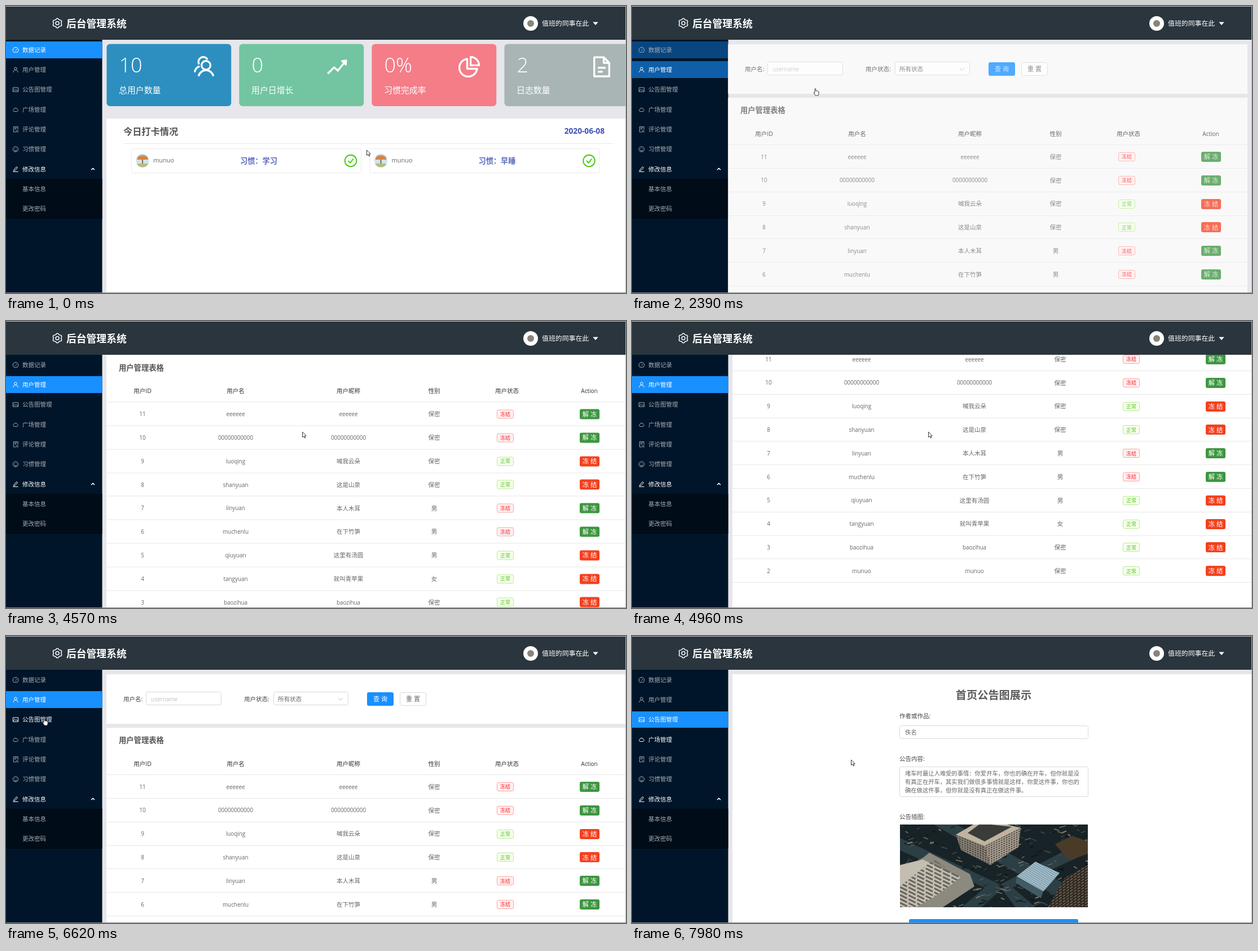
An HTML page with a canvas for the animation above (8000 ms loop, 1099x510 px).

```html
<!DOCTYPE html>
<html lang="zh-CN">
<head>
<meta charset="utf-8">
<style>
html, body { margin: 0; width: 100%; height: 100%; overflow: hidden; background: #e6e6eb; }
canvas { display: block; }
</style>
</head>
<body>
<canvas id="stage" width="1099" height="510"></canvas>
<script>
const ctx = document.getElementById('stage').getContext('2d');
const FONT = '"Open Sans", "Noto Sans CJK SC", "Noto Sans CJK", sans-serif';
const LOOP = 8000, STEP = 120;

// ---------- drawing helpers ----------
// y is the vertical middle of the glyphs
function text(s, x, y, size, color, weight = 400, align = 'left') {
  ctx.font = `${weight} ${size}px ${FONT}`;
  ctx.textAlign = align;
  ctx.fillStyle = color;
  ctx.fillText(s, x, y + size * 0.37);
}
function rect(x, y, w, h, fill, r = 0, stroke) {
  ctx.beginPath();
  ctx.roundRect(x, y, w, h, r);
  if (fill) { ctx.fillStyle = fill; ctx.fill(); }
  if (stroke) { ctx.strokeStyle = stroke; ctx.lineWidth = 1; ctx.stroke(); }
}
const box = (x, y, w, h, fill, stroke, r = 3) => rect(x + 0.5, y + 0.5, w - 1, h - 1, fill, r, stroke);
function disc(x, y, r, fill) {
  ctx.beginPath();
  ctx.arc(x, y, r, 0, 7);
  ctx.fillStyle = fill;
  ctx.fill();
}
// strokes (and optionally fills) an SVG path placed at x,y
function icon(d, x, y, scale, color, width, fill) {
  const p = new Path2D(d);
  ctx.save();
  ctx.translate(x, y);
  ctx.scale(scale, scale);
  ctx.lineWidth = width / scale;
  ctx.lineJoin = 'round';
  ctx.strokeStyle = color;
  if (fill) { ctx.fillStyle = fill; ctx.fill(p); }
  if (width) ctx.stroke(p);
  ctx.restore();
}
const lerp = (a, b, k) => a + (b - a) * k;
const hold = (t, keys) => keys.reduce((v, [at, value]) => t >= at ? value : v, 0);

// ---------- shell ----------
const RING = 'M9 0A9 9 0 1 1 -9 0A9 9 0 1 1 9 0Z';
const MENU = [
  ['数据记录', 'M-6 8A9.5 9.5 0 1 1 6 8ZM0 3L4 -3M-6 0h1M0 -6v1'],
  ['用户管理', 'M-4.5 -4A4.5 4.5 0 1 0 4.5 -4A4.5 4.5 0 1 0 -4.5 -4M-8 9A8 8 0 0 1 8 9'],
  ['公告图管理', 'M-9 -7H9V7H-9ZM-8 5L-3 -1L1 3L4 0L8 5M-5 -3h1'],
  ['广场管理', 'M-5 7A4.5 4.5 0 0 1 -6 -1A6.5 6.5 0 0 1 6 -1A4.5 4.5 0 0 1 5 7Z'],
  ['评论管理', 'M8 1V-9H-7V9H1M-4 -5H5M-4 -1H2M5 3a3 3 0 1 0 .1 0M7 8l2 2'],
  ['习惯管理', RING + 'M-4 2A4 4 0 0 0 4 2M-4 -3h2M2 -3h2'],
  ['修改信息', 'M-6 3L3 -8L7 -5L-2 5L-7 6ZM-9 9H9']
];
const menuY = i => 78 + i * 35.3;

function gearPath() {
  let d = '';
  for (let i = 0; i < 24; i++) {
    const a = (i + 1.5) * Math.PI / 12, r = i % 4 < 2 ? 8.4 : 7;
    d += (i ? 'L' : 'M') + r * Math.cos(a) + ' ' + r * Math.sin(a);
  }
  return d + 'ZM3 0A3 3 0 1 1 -3 0A3 3 0 1 1 3 0Z';
}
const GEAR = gearPath();

function header() {
  rect(0, 0, 1099, 60, '#2a353d');
  rect(0, 0, 1099, 1, '#c5c9ce');
  icon(GEAR, 91, 30.5, 1, '#fff', 1.5);
  text('后台管理系统', 107, 31.5, 17.8, '#fff', 700);
  disc(930, 31, 13, '#fff');
  disc(930, 31, 6, '#85857a');
  text('值班的同事在此', 950, 31, 11.9, '#fff', 500);
  icon('M-4.7 -2.5H4.7L0 3Z', 1045, 31, 1, '', 0, '#fff');
}

function sidebar(t) {
  rect(0, 60, 170.5, 450, '#001529');
  rect(0, 307, 170.5, 71, '#000c17');
  const on = [
    hold(t, [[0, 1], [2390, 0.4], [2510, 0]]),
    hold(t, [[2390, 0.6], [2510, 1], [6900, 0.4], [7020, 0]]),
    hold(t, [[6900, 0.6], [7020, 1]])
  ];
  MENU.forEach(([label, d], i) => {
    const y = menuY(i), top = Math.round(y - 15);
    ctx.globalAlpha = on[i] || 0;
    rect(0, top, 170.5, Math.round(y + 14.6) - top, '#1890ff');
    ctx.globalAlpha = 1;
    const bright = on[i] > 0.5 || i == 6 || (i == 2 && t >= 6500) || (i == 3 && t >= 7710);
    const color = bright ? '#fff' : '#a6adb4';
    icon(d, 17, y, 0.52, color, 1);
    text(label, 29, y, 10.5, color, i == 6 ? 500 : 400);
  });
  icon('M-3 1.5L0 -1.5L3 1.5', 154, menuY(6), 1, '#fff', 1.5);
  text('基本信息', 29, menuY(7), 10.5, '#a6adb4');
  text('更改密码', 29, menuY(8), 10.5, '#a6adb4');
}

// ---------- pages ----------
const CARDS = [
  ['10', '总用户数量', '#2d8fbf', 'M6.5 -1.5A4.5 4.5 0 1 1 -2.5 -1.5A4.5 4.5 0 1 1 6.5 -1.5M-5.5 9.5A7.7 7.7 0 0 1 9.5 9.5M3.5 -7.5A4.8 4.8 0 1 0 -5 -2.5M-9.5 5.5A7.5 7.5 0 0 1 -4.5 -.5'],
  ['0', '用户日增长', '#72c5a0', 'M-9 7L-2.5 .5L1.2 4L8.5 -5M5.5 -5.8L9.6 -6.4L9.3 -2.2Z'],
  ['0%', '习惯完成率', '#f47d88', 'M-2 -8A9 9 0 1 0 8 2H-2ZM1.5 -10V-1.5H10A8.5 8.5 0 0 0 1.5 -10Z'],
  ['2', '日志数量', '#a9b5b5', 'M-7.6 -9.7H2L7.6 -4V9.7H-7.6ZM2 -9.7V-4H7.6M-4 1H4M-4 5H1']
];
function dashboard(t) {
  const hover = hold(t, [[1600, 0.4], [1720, 0.8], [1840, 1]]);
  CARDS.forEach(([value, label, color, d], i) => {
    const x = 178.4 + i * 235;
    rect(x, 67.6, 220.8, 110.4, color, 6);
    if (!i) {
      ctx.globalAlpha = hover;
      rect(x, 67.6, 220.8, 110.4, '#0078b2', 6);
      ctx.globalAlpha = 1;
    }
    text(value, x + 22, 104.5, 36, '#fff', 350);
    text(label, x + 21.6, 149, 14.9, '#fff');
    icon(d, x + 172.6, 108, 1.75, '#fff', 3.3);
  });
  rect(178, 200, 921, 310, '#fff');
  text('今日打卡情况', 208, 223, 16.2, '#555', 700);
  text('2020-06-08', 1061, 222, 13.7, '#3f51b5', 700, 'right');
  rect(208, 244, 868, 1, '#e8e8e8');
  ['学习', '早睡'].forEach((habit, i) => {
    const x = 222 + i * 422.5;
    box(x, 253, 408, 44, '#fff', '#ebebeb');
    ctx.save();
    ctx.beginPath();
    ctx.arc(x + 20, 275, 11.5, 0, 7);
    ctx.clip();
    rect(x + 8, 263, 24, 24, '#d3e4e4');
    rect(x + 8, 263, 24, 6, '#9cc8d2');
    rect(x + 8, 280, 24, 8, '#b3bd84');
    rect(x + 19, 271, 2, 9, '#8a6a4a');
    icon('M-10 2A10 7 0 0 1 10 2Z', x + 20, 271, 1, '', 0, '#d9823c');
    ctx.restore();
    text('munuo', x + 39, 274, 11, '#666');
    text('习惯：' + habit, x + 193, 275.5, 13.2, '#5c6bc0', 700);
    icon('M10.3 0A10.3 10.3 0 1 1 -10.3 0A10.3 10.3 0 1 1 10.3 0ZM-4.5 0L-1 3.8L4.8 -3.5', x + 389, 275, 1, '#48c70c', 1.9);
  });
}

const COLS = [242, 407, 607, 759, 888, 1034];
const USERS = [
  ['eeeeee', 'eeeeee', '保密', 1], ['00000000000', '00000000000', '保密', 1],
  ['luoqing', '喊我云朵', '保密'], ['shanyuan', '这是山泉', '保密'],
  ['linyuan', '本人木耳', '男', 1], ['muchenlu', '在下竹笋', '男', 1],
  ['qiuyuan', '这里有汤圆', '男'], ['tangyuan', '就叫青苹果', '女'],
  ['baozihua', 'baozihua', '保密'], ['munuo', 'munuo', '保密']
];
function users(t) {
  const scroll = hold(t, [[4420, 41.8], [4570, 102.5], [4690, 140], [4840, 180], [4960, 200],
    [5800, 138], [5920, 30], [6040, 1], [6200, 0]]);
  ctx.translate(0, -scroll);
  rect(178, 68, 921, 88, '#fff');
  text('用户名:', 208, 112, 10.5, '#444');
  box(248, 99, 134, 24, '#fff', '#d9d9d9');
  text('username', 257, 112, 10, '#bfbfbf');
  text('用户状态:', 422, 112, 10.5, '#444');
  box(474, 99, 133, 24, '#fff', '#d9d9d9');
  text('所有状态', 482, 112, 10.5, '#666');
  icon('M-4 -2L0 2.5L4 -2', 593, 112, 1, '#bfbfbf', 1);
  rect(640, 100, 47, 24, '#1890ff', 3);
  text('查 询', 663.5, 112, 11, '#fff', 500, 'center');
  box(698, 100, 47, 24, '#fff', '#d9d9d9');
  text('重 置', 721.5, 112, 11, '#666', 400, 'center');

  rect(178, 163, 921, 600, '#fff');
  text('用户管理表格', 200, 185.5, 13.3, '#555', 700);
  ['用户ID', '用户名', '用户昵称', '性别', '用户状态', 'Action'].forEach((label, i) =>
    text(label, COLS[i], 227, i == 5 ? 10 : 10.5, '#333', 500, 'center'));
  rect(178, 246, 921, 1, '#e8e8e8');
  USERS.forEach(([name, nick, sex, frozen], i) => {
    const y = 268 + i * 41.8;
    [11 - i, name, nick, sex].forEach((s, c) => {
      const latin = /^[\x00-\x7f]+$/.test(s);
      text(s, COLS[c], y, latin ? 9.9 : 10.5, '#666', 400, 'center');
    });
    const top = Math.round(y - 8);
    box(870, top, 30, 16, frozen ? '#fff1f0' : '#f6ffed', frozen ? '#ffa39e' : '#b7eb8f', 2.5);
    text(frozen ? '冻结' : '正常', 885, y, 9, frozen ? '#f5222d' : '#52c41a', 400, 'center');
    rect(1017, top - 1, 35, 18, frozen ? '#3d963f' : '#f4401f', 3);
    text(frozen ? '解 冻' : '冻 结', 1034.5, y, 11.3, '#fff', 500, 'center');
    rect(178, Math.round(y + 20), 921, 1, '#e8e8e8');
  });
}

// flat aerial view of a crossing, x and y relative to the picture
function photo() {
  let seed = 7;
  const random = () => (seed = seed * 16807 % 2147483647) / 2147483647;
  const poly = (color, d) => icon(d, 0, 0, 1, '', 0, color);
  // rows of short strokes inside a shape, slanted by slope
  const windows = (d, color, slope, gap, dash) => {
    ctx.save();
    ctx.clip(new Path2D(d));
    ctx.setLineDash(dash);
    let rows = '';
    for (let y = -330; y < 480; y += gap) rows += `M0 ${y}L333 ${y + slope * 333}`;
    icon(rows, 0, 0, 1, color, gap * 0.45);
    ctx.restore();
  };
  ctx.save();
  ctx.beginPath();
  ctx.rect(475, 335, 333, 147);
  ctx.clip();
  ctx.translate(475, 335);
  rect(0, 0, 333, 147, '#182327');
  poly('#2c3f45', 'M60 0L100 0L333 128V147H310ZM0 24L185 110L145 147H110L150 112L0 46ZM333 25L175 108L205 147H240L200 112L333 50Z');
  for (let i = 0; i < 260; i++) {
    const x = random() * 333, y = random() * 147, down = random() < 0.5;
    icon(`M${x} ${y}l${4 + random() * 8} ${down ? 3 : -3}`, 0, 0, 1,
      ['#0d1417', '#4c6468', '#3a4a48', '#827a67'][i % 4], 0.8 + random() * 1.4);
  }
  poly('#4a3b28', 'M275 35L305 20L333 30V52L300 64Z');
  poly('#8b8377', 'M99 18L150 38L160 72L108 45Z');
  poly('#a89e90', 'M150 38L214 6L210 40L160 72Z');
  windows('M99 18L150 38L160 72L108 45Z', '#3c3a37', 0.45, 4, [3, 2]);
  windows('M150 38L214 6L210 40L160 72Z', '#4a443e', -0.5, 4, [3, 2]);
  poly('#bfb3a0', 'M99 18L130 0H190L214 6L150 38Z');
  poly('#3a3c3a', 'M120 15L143 -2L198 4L150 30Z');
  poly('#8c897f', 'M0 92L52 50L124 88L132 110L76 147H10Z');
  poly('#c4beb1', 'M0 72L40 62L108 94L62 128L28 147H0Z');
  windows('M0 110L60 62L108 94L62 128L28 147H0Z', '#68665e', 0.5, 7, [14, 3]);
  poly('#7f9aa8', 'M207 92L240 66L283 86L254 119Z');
  windows('M207 92L240 66L283 86L254 119Z', '#a9c3cf', 0.62, 4, []);
  poly('#425a64', 'M207 92L254 119L250 131L205 104Z');
  const tower = 'M262 147L292 95L333 72V147Z';
  poly('#26231f', tower);
  windows(tower, '#67594b', -0.7, 5, [6, 2]);
  ctx.restore();
}
function notice() {
  const quote = ['堵车时最让人难受的事情：你爱开车，你也的确在开车，但你就是没',
    '有真正在开车，其实我们做很多事情就是这样，你爱这件事，你也的',
    '确在做这件事，但你就是没有真正在做这件事。'];
  rect(178, 68, 921, 442, '#fff');
  text('首页公告图展示', 641, 104.5, 19.2, '#5c5c5c', 700, 'center');
  text('作者或作品:', 474, 142.5, 10.5, '#444');
  box(474, 159, 335, 24, '#fff', '#d9d9d9');
  text('佚名', 484, 171, 10.4, '#666');
  text('公告内容:', 474, 218, 10.5, '#444');
  box(474, 232, 335, 54, '#fff', '#d9d9d9');
  quote.forEach((line, i) => text(line, 484, 244 + i * 15.3, 10.3, '#666'));
  text('公告插图:', 474, 321, 10.5, '#444');
  photo();
  rect(491, 503, 300, 24, '#1890ff', 3);
}

// ---------- pointer ----------
// start time, number of steps, end position
const MOVES = [
  [150, 3, 497, 243], [540, 1, 492, 243], [690, 2, 414, 236], [960, 2, 359, 204],
  [1230, 2, 340, 184], [1600, 3, 322, 159], [1990, 1, 322, 146], [2660, 4, 527, 197],
  [3550, 1, 526, 197], [6200, 1, 320, 177], [6350, 1, 145, 157], [6500, 2, 65, 146],
  [7290, 2, 66, 150], [7560, 1, 66, 165], [7710, 2, 61, 183], [7980, 1, 389, 220]
];
const ARROW = 'M0 0V9.5L2.3 7.5L3.9 11L5.4 10.3L3.9 7H6.8Z';
const HAND = 'M2.5 7V1.3Q3.4 .3 4.3 1.3V4.6L8 5.3Q9.6 5.6 9.6 7V9.5Q9.5 11 8.5 13H3.8L.6 8.6Q.5 7 2.5 8Z';
function pointer(t) {
  let x = 640, y = 256;
  for (const [start, steps, endX, endY] of MOVES) {
    if (t < start) break;
    const k = Math.min(1, (Math.floor((t - start) / STEP) + 1) / steps);
    x = lerp(x, endX, k);
    y = lerp(y, endY, k);
  }
  const hand = (t >= 1600 && t < 2660) || (t >= 6500 && t < 7980);
  icon(hand ? HAND : ARROW, x - 0.5, y, 1, '#222', 0.9, '#fff');
}

// ---------- frame ----------
function draw(t) {
  const page = t < 2240 ? dashboard : t < 6900 ? users : notice;
  const enter = t < 2240 ? 1 : t < 6900
    ? hold(t, [[2240, 0.2], [2390, 0.75], [2510, 1]])
    : hold(t, [[6900, 0.2], [7020, 0.75], [7140, 1]]);
  rect(0, 0, 1099, 510, '#e6e6eb');
  sidebar(t);
  ctx.save();
  ctx.beginPath();
  ctx.rect(0, 60, 1099, 450);
  ctx.clip();
  ctx.globalAlpha = enter;
  ctx.translate(Math.round(-31 * (1 - enter)), 0);
  page(t);
  ctx.restore();
  header();
  rect(1098, 0, 1, 510, '#b4b4b8');
  rect(0, 509, 1099, 1, '#85888c');
  pointer(t);
}
function tick() {
  draw(performance.now() % LOOP);
  requestAnimationFrame(tick);
}
tick();
</script>
</body>
</html>
```
